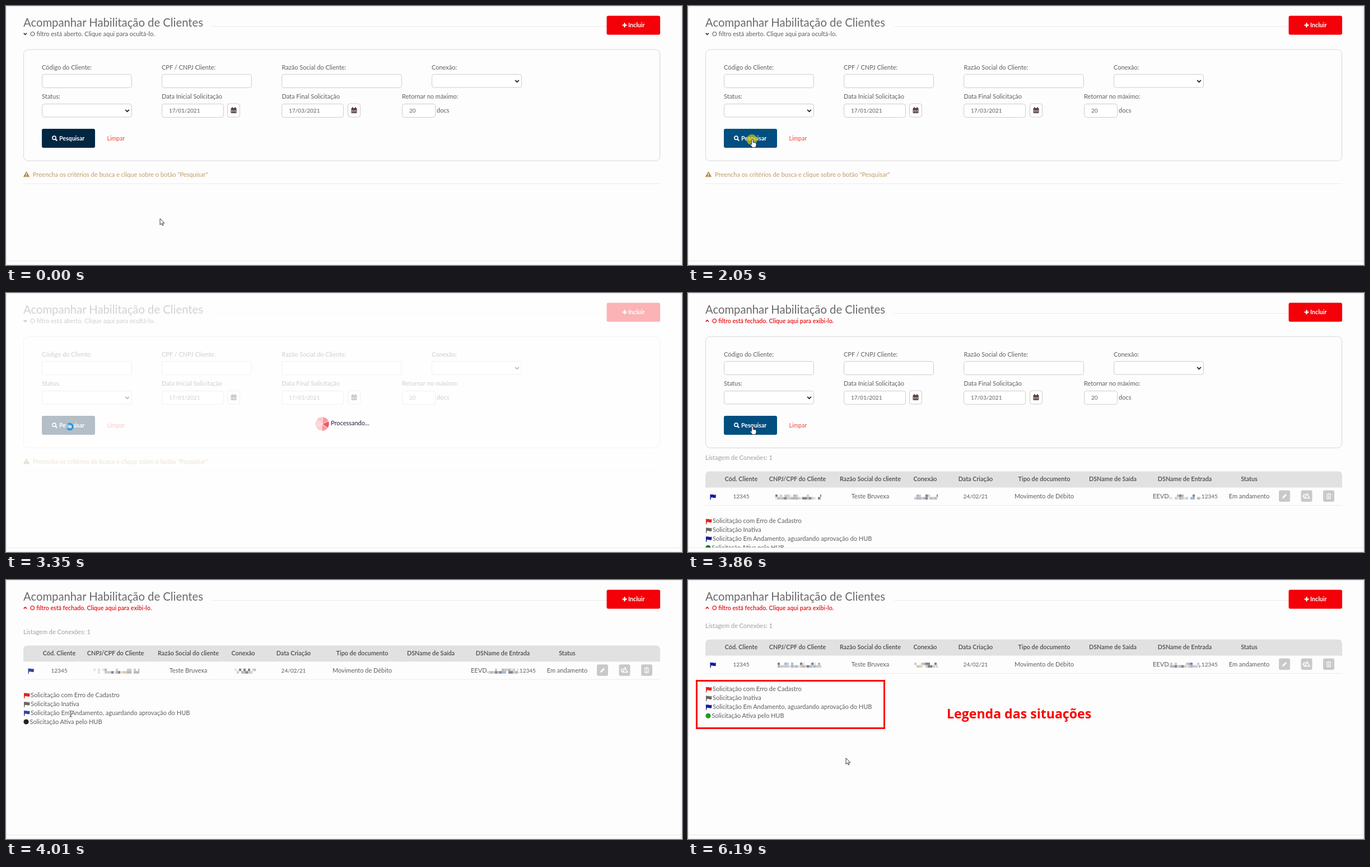
Write an HTML page that moves like this. It is 1207 px wide and 464 px high and loops after 8000 ms.

```html
<!DOCTYPE html>
<html lang="pt-BR">
<head>
<meta charset="utf-8">
<title>Acompanhar Habilitação de Clientes</title>
<style>
html, body { margin: 0; width: 100%; height: 100%; overflow: hidden; background: #fdfdfd; }
svg { display: block; width: 1207px; height: 464px; }
text { font: 11px Lato, "Open Sans", sans-serif; fill: #5e5e5e; white-space: pre; }
.title { font-size: 20.25px; fill: #6a6a6a; }
.num { font-size: 10px; }
.semi { font-weight: 600; font-size: 10.8px; fill: #4a4a4a; }
.alert { font-weight: 600; font-size: 10.65px; fill: #e60f14; }
.btn { font-weight: 700; font-size: 10.6px; fill: #fff; }
.link { font-size: 10.5px; fill: #f2473d; }
.warn { fill: #c09c66; }
.soft { fill: #a0a0a0; }
.busy { font-size: 11px; fill: #223; }
.mid { text-anchor: middle; }
.note { font: 700 23.1px "Open Sans", "Noto Sans", sans-serif; fill: #fe0000; }
.field { fill: #fff; stroke: #ccc; }
.rule { fill: none; stroke: #ebebeb; }
.icon { fill: none; stroke: #fff; stroke-width: 1.6; }
.cur { fill: #fff; stroke: #222; stroke-width: .9; stroke-linejoin: round; }
</style>
</head>
<body>
<svg id="stage" viewBox="0 0 1207 464"></svg>
<script>
const LOOP = 8000;
const stage = document.getElementById('stage');

// ---- drawing helpers -------------------------------------------------
const text = (x, y, s, cls = '') => `<text x="${x}" y="${y}" class="${cls}">${s}</text>`;
const rect = (x, y, w, h, r, attrs) =>
  `<rect x="${x}" y="${y}" width="${w}" height="${h}" rx="${r}" ${attrs}/>`;
const path = (d, attrs) => `<path d="${d}" ${attrs}/>`;
const group = (id, body, attrs = '') => `<g id="${id}" ${attrs}>${body}</g>`;
const field = (x, y, w, h = 24) => rect(x + .5, y + .5, w - 1, h, 4, 'class="field"');
const chevron = (x, y, r, dir, color) =>
  path(`M${x - r} ${y - dir * r / 2}l${r} ${dir * r} ${r} ${-dir * r}`,
    `fill="none" stroke="${color}" stroke-width="1.7"`);
const select = (x, y, w) => field(x, y, w, 23.5) + chevron(x + w - 8.5, y + 12.5, 3.4, 1, '#222');
const flag = (x, y, color, attrs = '') =>
  path(`M${x} ${y}h1.4v.7q2.2-1 4.3 0t4.6-.2v5.6q-2.3 1.2-4.6.2t-4.3 0v3.4h-1.4z`,
    `fill="${color}" ${attrs}`);

const calendar = x => field(x, 174.5, 23) +
  rect(x + 6.5, 183, 10, 9, 1, 'fill="#4a3634"') +
  path(`M${x + 9} 181v3M${x + 14} 181v3`, 'stroke="#4a3634" stroke-width="1.6"') +
  path(`M${x + 7.5} 187h8M${x + 7.5} 189.5h8`,
    'stroke="#eadfd8" stroke-width="1.5" stroke-dasharray="1.9 1.1"');

function random(seed) {
  return () => (seed = (seed * 16807) % 2147483647) / 2147483647;
}

// Censored values: loose blocks of grey, blue and sand, denser below
function mosaic(x, w, rnd) {
  const tones = ['#85848c', '#bcb8b6', '#a5bad2', '#dbc9b6', '#e5e2df', '#c8ccd6'];
  let out = '';
  for (let cx = 0; cx < w; cx += 4)
    for (let row = 0; row < 2; row++) {
      const tone = tones[Math.floor(rnd() * tones.length)];
      if (rnd() < .4 + row * .4)
        out += rect(x + cx, 148 + row * 4.5, Math.min(4, w - cx), 4.5, 0, `fill="${tone}"`);
    }
  return out;
}
function mosaics(id, seed) {
  const rnd = random(seed);
  for (let i = 0; i < 5; i++) rnd();
  return group(id, mosaic(156, 82, rnd) + mosaic(404, 42, rnd) + mosaic(861, 53, rnd));
}

// ---- page parts ------------------------------------------------------
const header =
  text(31, 36.5, 'Acompanhar Habilitação de Clientes', 'title') +
  path('M368 36.5H1073', 'class="rule"') +
  rect(1072.5, 17.5, 95.5, 34, 3, 'fill="#f40009"') +
  path('M1100.5 34.3h8M1104.5 30.3v8', 'stroke="#fff" stroke-width="2.3"') +
  text(1111, 38.3, 'Incluir', 'btn') +
  group('opened', chevron(34.3, 50, 2.6, 1, '#333') +
    text(43, 53.5, 'O filtro está aberto. Clique aqui para ocultá-lo.')) +
  group('closed', chevron(34.3, 50, 2.6, -1, '#e60f14') +
    text(43, 53.5, 'O filtro está fechado. Clique aqui para exibi-lo.', 'alert'));

const labels = [
  [64, 114, 'Código do Cliente:'], [278, 114, 'CPF / CNPJ Cliente:'],
  [492.5, 114, 'Razão Social do Cliente:'], [760, 114, 'Conexão:'],
  [64, 166.3, 'Status:'], [278, 166.3, 'Data Inicial Solicitação'],
  [492.5, 166.3, 'Data Final Solicitação'], [707, 166.3, 'Retornar no máximo:'],
  [769, 191.3, 'docs']
].map(l => text(...l)).join('');

const filter =
  rect(31.5, 78, 1136, 199.5, 8, 'id="panel" fill="#fdfdfd" stroke="#d6d6d6"') +
  group('form', labels +
    field(64, 122, 161) + field(278, 122, 161) + field(492, 122, 215) + select(760, 122, 161) +
    select(64, 175, 161) + field(278, 175, 111) + calendar(395) +
    field(492, 175, 111) + calendar(610) + field(707, 175, 60) +
    text(291, 191.3, '17/01/2021', 'num') + text(505, 191.3, '17/03/2021', 'num') +
    text(720, 191.3, '20', 'num') +
    rect(64, 220, 95, 34, 3, 'id="search"') +
    '<circle cx="86" cy="236.2" r="3.1" class="icon" stroke-width="2"/>' +
    path('M88.2 238.5l3 3', 'stroke="#fff" stroke-width="2.2"') +
    text(95, 241, 'Pesquisar', 'btn') + text(180.5, 241, 'Limpar', 'link'),
    'clip-path="url(#fold)"');

const hint =
  path('M36.5 296.8l5 9h-10z', 'fill="#b98c4a" stroke="#b98c4a" stroke-linejoin="round"') +
  path('M36.5 299.6v3.2M36.5 303.8v1.3', 'stroke="#fff" stroke-width="1.3"') +
  text(48, 305.5, 'Preencha os critérios de busca e clique sobre o botão "Pesquisar"', 'warn') +
  path('M31 318.5H1168', 'class="rule"');

const columns = [
  [95, 'Cód. Cliente', '12345', 'num'], [195.5, 'CNPJ/CPF do Cliente'],
  [325.5, 'Razão Social do cliente', 'Teste Bruvexa'], [423.5, 'Conexão'],
  [513.5, 'Data Criação', '24/02/21', 'num'], [636, 'Tipo de documento', 'Movimento de Débito'],
  [758.5, 'DSName de Saída'], [887, 'DSName de Entrada'], [1002, 'Status', 'Em andamento']
].map(([x, head, value = '', cls = '']) =>
  text(x, 124.4, head, 'semi mid') + text(x, 155.2, value, 'mid ' + cls)).join('');

const tools = [1065, 1104.5, 1144]
  .map(x => rect(x - 10, 140.5, 20, 20.5, 3, 'fill="#c9c9c9"')).join('') +
  path('M1061 155l.8-2.8 5.2-5.2 2 2-5.2 5.2z', 'fill="#fff"') +
  path('M1102.5 148q-4 .3-4 3t4 3M1105.5 146.5l4.2 8h-8.4z', 'class="icon"') +
  path('M1139.5 147.6h9M1142.5 146h3M1141 148.8v6.4h6v-6.4M1144 149.5v5',
    'class="icon" style="stroke-width:1.2"');

const results =
  text(31, 86, 'Listagem de Conexões: 1', 'soft') +
  path('M31 135.5V114.5q0-8 8-8H1160q8 0 8 8V135.5z', 'fill="#e1e1e1"') +
  columns + mosaics('blurA', 4211) + mosaics('blurB', 917) + mosaics('blurC', 30577) +
  text(830, 155.2, 'EEVD.') + text(914.5, 155.2, '.12345', 'num') + tools +
  path('M31 167.5H1168', 'class="rule"') +
  flag(39.5, 147.5, '#141ba0', 'class="blue"') +
  flag(32, 191.5, '#e2231a') + text(44, 199.4, 'Solicitação com Erro de Cadastro') +
  flag(32, 207.3, '#686868') + text(44, 215.3, 'Solicitação Inativa') +
  flag(32, 223, '#141ba0', 'class="blue"') +
  text(44, 231.2, 'Solicitação Em Andamento, aguardando aprovação do HUB') +
  '<circle id="ball" cx="36" cy="243.3" r="4.6"/>' +
  text(42.5, 247.2, 'Solicitação Ativa pelo HUB');

const wedge = i => {
  const at = a => `${12.5 * Math.cos(a)} ${12.5 * Math.sin(a)}`;
  const a = i * Math.PI / 3;
  return path(`M0 0L${at(a)}A12.5 12.5 0 0 1 ${at(a + Math.PI / 3)}z`,
    `fill="#f4384a" opacity="${[.85, .5, .22, .2, .28, .5][i]}" stroke="#fff" stroke-width=".6"`);
};
const loading =
  group('spinner', [0, 1, 2, 3, 4, 5].map(wedge).join('')) +
  text(580, 237.2, 'Processando...', 'busy');

const cursors =
  group('arrow', path('M0 0V11l2.6-2.4 1.7 3.7 1.7-.8-1.7-3.5h3.5z', 'class="cur"')) +
  group('hand', path('M-1.3.8C-1.3-.7 1.3-.7 1.3.8V5.2L5.6 6.1Q7 6.5 7 8v2.5l-1.4 4H0' +
    'L-3.8 9.3Q-4.2 7.8-2.6 8l1.3 1.3z', 'class="cur"')) +
  group('beam', path('M-2-4.5h1.6l.9.7.9-.7H3M.5-4V5.5M-2 6h1.6l.9-.7.9.7H3',
    'fill="none" stroke="#333"')) +
  group('ring', '<circle r="5" fill="none" stroke="#2a94e0" stroke-width="3.4"/>' +
    path('M0-5A5 5 0 0 1 5 0', 'fill="none" stroke="#8fd0fa" stroke-width="2.6"'));

stage.innerHTML =
  '<defs><clipPath id="view"><rect width="1205" height="456"/></clipPath>' +
  '<clipPath id="fold"><rect id="foldBox" x="31" y="78" width="1138" height="200"/></clipPath></defs>' +
  rect(0, 0, 1207, 464, 0, 'fill="#fdfdfd"') +
  group('page', header + group('filter', filter) + group('hint', hint) + group('results', results) +
    rect(0, 0, 1205, 456, 0, 'id="veil" fill="#fff"') + group('loading', loading),
    'clip-path="url(#view)"') +
  path('M0 .8H1207M.5 0V464M1205.5 0V464', 'fill="none" stroke="#e3e3e3"') +
  path('M0 456.5H1207M0 463.5H1207', 'class="rule"') +
  group('legend', rect(15.5, 180.5, 335, 85, 0, 'fill="none" stroke="#fe0000" stroke-width="3"') +
    text(462, 248.3, 'Legenda das situações', 'note')) +
  '<circle id="click" cx="114" cy="239.5" r="9.5" fill="#e6d200"/>' +
  group('cursor', cursors);

// ---- timeline --------------------------------------------------------
const el = {};
stage.querySelectorAll('[id]').forEach(n => el[n.id] = n);
const blues = stage.querySelectorAll('.blue');
const show = (id, on) => el[id].style.display = on ? '' : 'none';
const clamp = v => Math.max(0, Math.min(1, v));
const ease = p => p < .5 ? 2 * p * p : 1 - 2 * (1 - p) * (1 - p);
const between = (t, a, b) => clamp((t - a) / (b - a));

// Screen refreshes: first, last, count
const runs = [[500, 1270, 11], [2050, 2810, 11], [2890, 3680, 11],
  [3770, 4090, 5], [5020, 5710, 10], [6190, 6190, 1]];
const ticks = [0];
for (const [a, b, n] of runs)
  for (let i = 0; i < n; i++) ticks.push(a + (n > 1 ? (b - a) * i / (n - 1) : 0));
const snap = t => ticks.reduce((last, k) => k <= t + .5 ? k : last, 0);

// Start of each step, results offset, panel height
const slide = [[0, 213, 199.5], [3925, 112, 98], [4005, 10.7, 0], [4085, 0, 0]];

function pointer(t) {
  const back = t > 4500;
  const p = ease(back ? between(t, 4965, 5710) : between(t, 445, 1270));
  const [x0, y0, x1, y1] = back ? [115, 239, 282, 319] : [275, 381, 115, 239];
  return [x0 + (x1 - x0) * p, y0 + (y1 - y0) * p];
}

function draw(time) {
  const t = snap(time);
  const done = t >= 3770;
  const [, dy, height] = slide.filter(s => s[0] <= t).pop();
  const folding = dy > 5 && dy < 20;
  const veil = done ? (t < 3840 ? .3 : 0) : .7 * ease(between(t, 2350, 2810));
  const waiting = veil > 0 && !done;
  const [x, y] = pointer(t);
  const onButton = height > 150 && x > 64 && x < 159 && y < 254;

  show('opened', !done);
  show('closed', done);
  show('hint', !done);
  show('filter', height > 0);
  el.panel.setAttribute('height', height);
  el.foldBox.setAttribute('height', height);
  el.search.setAttribute('fill', onButton && !waiting ? '#004f80' : '#002641');

  show('results', done);
  el.results.setAttribute('transform', `translate(0 ${dy})`);
  show('blurA', dy > 20);
  show('blurB', folding);
  show('blurC', dy < 5);
  el.ball.setAttribute('fill', dy > 20 ? '#1c7a1c' : folding ? '#222' : '#259a1c');
  blues.forEach(b => b.setAttribute('fill', folding ? '#33479a' : '#141ba0'));

  el.veil.setAttribute('opacity', veil);
  show('loading', waiting);
  el.loading.setAttribute('opacity', clamp(veil / .7));
  el.spinner.setAttribute('transform', `translate(564.5 234.5) rotate(${(t - 3350) * .36})`);

  show('click', t >= 2040 && t < 2400);
  el.click.setAttribute('opacity', .65 * (1 - between(t, 2130, 2400)));
  show('legend', t >= 6190);

  const onText = done ? height === 0 && y < 250 : y > 296 && y < 308;
  const shape = waiting ? 'ring' : onButton ? 'hand' : onText ? 'beam' : 'arrow';
  for (const id of ['arrow', 'hand', 'beam', 'ring']) show(id, id === shape);
  el.cursor.setAttribute('transform', `translate(${x} ${y})`);
  el.ring.setAttribute('transform', `translate(-1 .5) rotate(${t * .4})`);
}

function loop() {
  draw(performance.now() % LOOP);
  requestAnimationFrame(loop);
}
draw(0);
loop();
</script>
</body>
</html>
```
